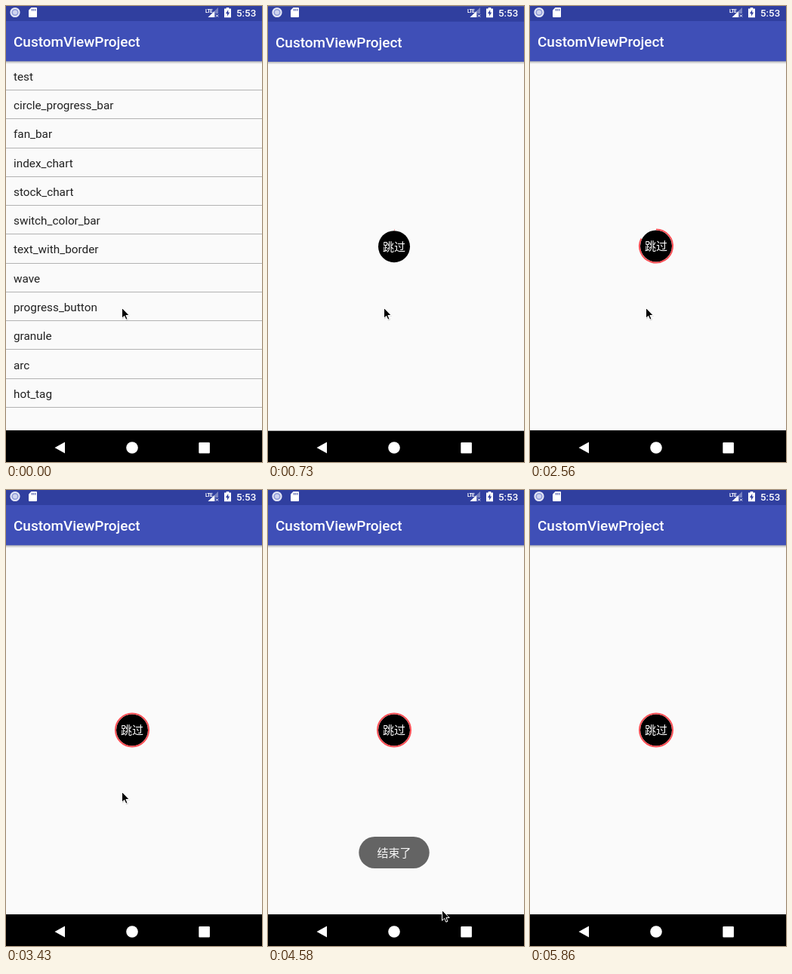
An HTML page that plays this animation: 339x605 px, repeating every 5900 ms.

```html
<!DOCTYPE html>
<html lang="zh-CN">
<head>
<meta charset="utf-8">
<title>Progress button</title>
<style>
  html, body { margin: 0; width: 100%; height: 100%; overflow: hidden; background: #000; }
  svg { display: block; width: 339px; height: 605px; }
  text { font-family: Roboto, sans-serif; }
  .title { font-size: 18.95px; font-weight: 500; fill: #fff; }
  .row { font-size: 15.3px; fill: #212121; }
  .cjk { font-family: "Noto Sans CJK SC", "Noto Sans CJK", sans-serif; font-size: 15px; fill: #fff; text-anchor: middle; }
</style>
</head>
<body>
<svg viewBox="0 0 339 605" xmlns="http://www.w3.org/2000/svg">
  <defs>
    <linearGradient id="shade" x1="0" y1="0" x2="0" y2="1">
      <stop offset="0" stop-color="#000" stop-opacity=".3"/>
      <stop offset="1" stop-color="#000" stop-opacity="0"/>
    </linearGradient>
    <g id="screen">
      <rect width="339" height="605"/>
      <rect width="339" height="563" fill="#fafafa"/>
      <rect y="73" width="339" height="4" fill="url(#shade)"/>
      <rect width="339" height="73.3" fill="#3f4fb7"/>
      <rect width="339" height="20" fill="#303f9f"/>
      <text class="title" x="10" y="54">CustomViewProject</text>
    </g>
  </defs>

  <g id="list"><use href="#screen"/></g>

  <g id="page">
    <use href="#screen"/>
    <circle cx="167" cy="318.5" r="21"/>
    <path id="ring" fill="none" stroke="#ff4f55" stroke-width="2"/>
    <text class="cjk" x="167" y="324">跳过</text>
  </g>

  <g id="status" fill="#fff">
    <circle cx="12" cy="8.5" r="5.6" fill="#8f9bd8" stroke="#e6e8f6" stroke-width="2"/>
    <circle cx="12" cy="8.5" r="3" fill="#cfd4ee"/>
    <path d="M33.5 2H40a1 1 0 0 1 1 1V14a1 1 0 0 1-1 1H31a1 1 0 0 1-1-1V5.5Z"/>
    <path d="M34.5 4v2.5M36.7 4v2.5M38.9 4v2.5" stroke="#303f9f" stroke-width="1"/>
    <text x="264" y="8.6" font-size="6.6" font-weight="700" textLength="" letter-spacing="-.5">LTE</text>
    <path d="M281 2V10H277V15H267.5Z" opacity=".35"/>
    <path d="M276 7V15H267.5Z"/>
    <path d="M278 11.5l3 3m0-3l-3 3" stroke="#fff" stroke-width="1"/>
    <path d="M289 3.5h2.7V2h3.6v1.5H298V15.3H289Z"/>
    <path d="M294.2 5l-3.2 5h2v3.6l3.2-5.2h-2Z" fill="#303f9f"/>
    <text x="305" y="13.8" font-size="13.3" font-weight="500">5:53</text>
  </g>

  <g fill="#fff">
    <path d="M64.5 586L78 578.4V593.6Z"/>
    <circle cx="167" cy="586" r="7.8"/>
    <rect x="255.3" y="579" width="14.6" height="14.4" rx="1"/>
  </g>

  <g id="toast">
    <rect x="120.3" y="460" width="93.4" height="42" rx="21" fill="#646464"/>
    <text class="cjk" x="167" y="486.5" fill-opacity=".95">结束了</text>
  </g>

  <g id="cursor">
    <path d="M1 1.5V15.5L4.2 12.5 6.4 17.5 9 16.3 6.9 11.5H11.2Z" fill="#000" opacity=".18"/>
    <path d="M.5 .5V14.2L3.7 11.3 5.8 16.2 8 15.2 5.9 10.5H10.2Z" stroke="#fff" stroke-width="1" stroke-linejoin="round"/>
  </g>
</svg>
<script>
const LOOP = 5900;
const $ = id => document.getElementById(id);
const clamp = v => Math.max(0, Math.min(1, v));
const show = (id, on) => $(id).setAttribute('display', on ? 'inline' : 'none');

const items = ['test', 'circle_progress_bar', 'fan_bar', 'index_chart', 'stock_chart', 'switch_color_bar',
  'text_with_border', 'wave', 'progress_button', 'granule', 'arc', 'hot_tag'];

function add(tag, attrs, text = '') {
  const el = document.createElementNS('http://www.w3.org/2000/svg', tag);
  for (const k in attrs) el.setAttribute(k, attrs[k]);
  el.textContent = text;
  $('list').appendChild(el);
}
items.forEach((name, i) => {
  const y = 38.27 * i;
  add('text', { class: 'row', x: 10, y: 98.8 + y }, name);
  add('rect', { x: 0, y: Math.round(111 + y), width: 339, height: 1, fill: '#b2b2b2' });
});

// bursts of evenly spaced screen updates: start, end, count
const bursts = [[530, 1090, 10], [1150, 1740, 11], [1800, 2380, 11], [2440, 3020, 11], [3080, 3660, 10],
  [3720, 3840, 3], [4020, 4580, 11], [4640, 5200, 11], [5260, 5260, 1], [5440, 5680, 5], [5860, 5860, 1]];

function snap(t) {
  let out = 0;
  for (const [a, b, n] of bursts) {
    if (t < a) break;
    const step = n > 1 ? (b - a) / (n - 1) : 1;
    out = Math.min(b, a + Math.floor((t - a) / step + 1e-6) * step);
  }
  return out;
}

function arc(f) {
  if (f <= 0) return '';
  const r = 22, cx = 167, cy = 318.5;
  if (f >= 1) return `M${cx} ${cy - r}a${r} ${r} 0 1 1 0 ${2 * r}a${r} ${r} 0 1 1 0 ${-2 * r}Z`;
  const a = f * 2 * Math.PI;
  return `M${cx} ${cy - r}A${r} ${r} 0 ${+(f > .5)} 1 ${cx + r * Math.sin(a)} ${cy - r * Math.cos(a)}`;
}

// cursor way-points: time, x, y
const path = [[3960, 153, 400], [4580, 230, 557], [4660, 234, 561], [4900, 118, 582], [5200, 225, 596], [5260, 228, 606]];

function cursorAt(t) {
  if (t <= path[0][0]) return path[0].slice(1);
  for (let i = 1; i < path.length; i++) {
    const [ta, xa, ya] = path[i - 1], [tb, xb, yb] = path[i];
    if (t <= tb) {
      const u = (t - ta) / (tb - ta), e = u * u * (3 - 2 * u);
      return [xa + (xb - xa) * e, ya + (yb - ya) * e];
    }
  }
  return null;
}

function toastAlpha(t) {
  if (t >= 5860) return 0;
  const fadeIn = 1 - (1 - clamp((t - 3425) / 420)) ** 2;
  const fadeOut = 1 - clamp((t - 5420) / 400) ** 2;
  return fadeIn * fadeOut;
}

function draw(now) {
  const t = snap(now % LOOP);

  const open = t - 515;
  show('page', open > 0);
  const lift = 48.4 * (1 - clamp(open / 350)) ** 5;
  $('page').setAttribute('transform', `translate(0 ${lift.toFixed(2)})`);
  $('page').setAttribute('opacity', 1 - (1 - clamp(open / 200)) ** 4);

  const turn = clamp((t - 615) / 2680);
  $('ring').setAttribute('d', arc((1 - Math.cos(Math.PI * turn)) / 2));

  $('toast').setAttribute('opacity', toastAlpha(t));

  const pos = t < 5260 && cursorAt(t);
  show('cursor', pos);
  if (pos) $('cursor').setAttribute('transform', `translate(${Math.round(pos[0])} ${Math.round(pos[1])})`);
}

function tick() {
  draw(performance.now());
  requestAnimationFrame(tick);
}
tick();
</script>
</body>
</html>
```
